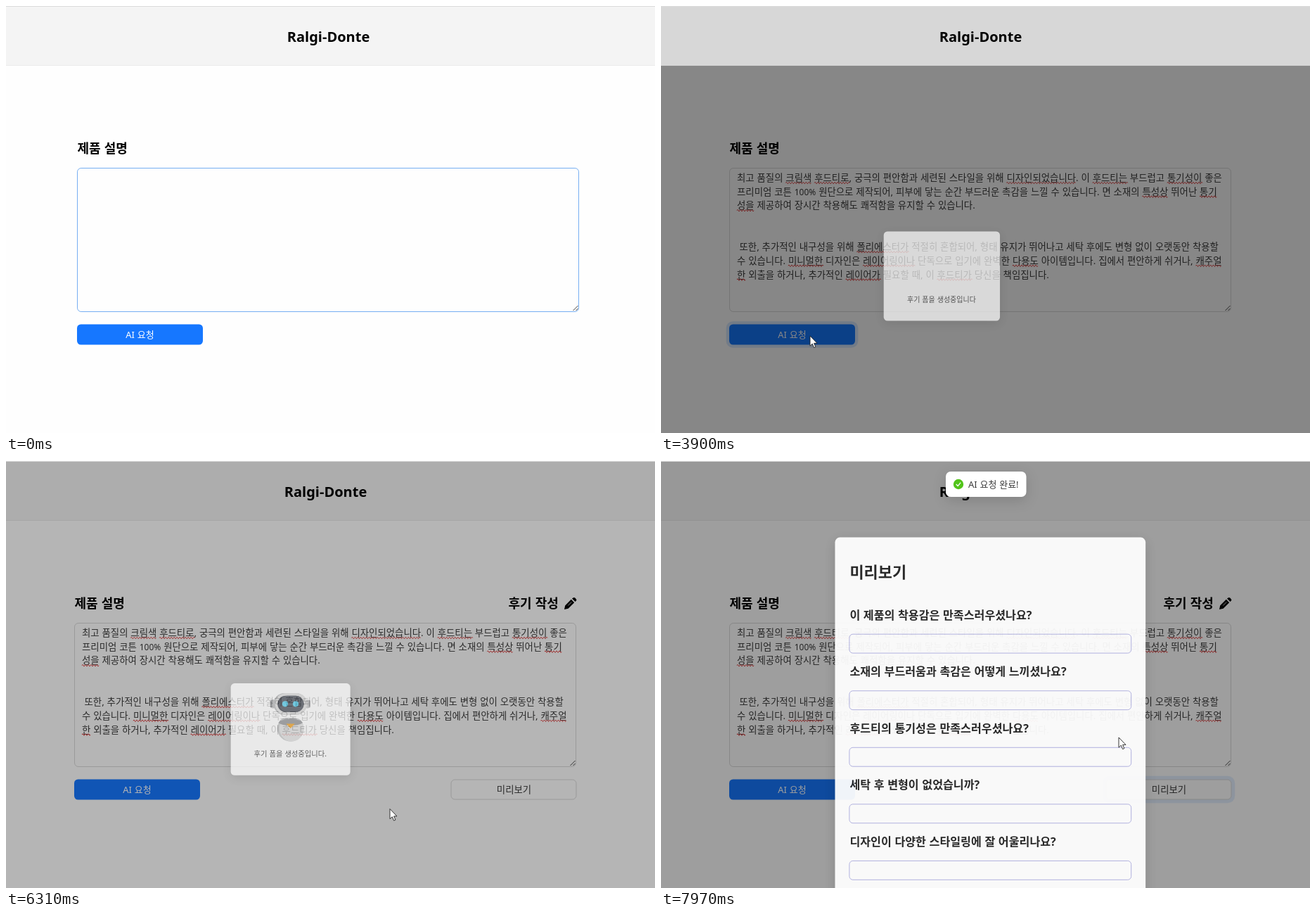
Recreate the animation shown at these times as an HTML page. Size 923 px wide and 607 px high, loop 8000 ms.

```html
<!DOCTYPE html>
<html lang="ko">
<head>
<meta charset="utf-8">
<style>
html, body { margin: 0; width: 100%; height: 100%; overflow: hidden; background: #fefefe; }
svg { display: block; width: 100%; height: 100%; }
text { font-family: "Noto Sans", "Noto Sans CJK KR", sans-serif; word-spacing: .4px; white-space: pre; }
.card { filter: drop-shadow(0 5px 9px rgba(0, 0, 0, .14)); }
</style>
</head>
<body>
<svg id="stage" viewBox="0 0 923 607"></svg>
<script>
const LOOP = 8000, BLUE = [22, 119, 255], LIGHT = [64, 150, 255], GRAY = [217, 217, 217], INK = [60, 60, 60];
const OPEN1 = 3860, CLOSE1 = 6240, OPEN2 = 7840, PASTE = 2060;

// Brackets mark words flagged by the spell checker.
const lines = [
  [112, 249, '최고 품질의 [크림색] [후드티로], 궁극의 편안함과 세련된 스타일을 위해 [디자인되었습니다]. 이 [후드티는] 부드럽고 [통기성이] 좋은'],
  [112, 268.6, '프리미엄 코튼 100% 원단으로 제작되어, 피부에 닿는 순간 부드러운 촉감을 느낄 수 있습니다. 면 소재의 [특성상] 뛰어난 [통기]'],
  [112, 288.2, '[성을] 제공하여 장시간 착용해도 쾌적함을 유지할 수 있습니다.'],
  [115.5, 347.2, '또한, 추가적인 내구성을 위해 [폴리에스터가] 적절히 혼합되어, 형태 유지가 뛰어나고 세탁 후에도 변형 없이 오랫동안 착용할'],
  [112, 366.8, '수 있습니다. [미니멀한] 디자인은 [레이어링이나] 단독으로 입기에 완벽한 [다용도] 아이템입니다. 집에서 편안하게 쉬거나, [캐주얼]'],
  [112, 386.5, '[한] 외출을 하거나, 추가적인 [레이어가] 필요할 때, 이 [후드티가] 당신을 책임집니다.']
];
const questions = [
  '이 제품의 착용감은 만족스러우셨나요?', '소재의 부드러움과 촉감은 어떻게 느끼셨나요?',
  '후드티의 통기성은 만족스러우셨나요?', '세탁 후 변형이 없었습니까?', '디자인이 다양한 스타일링에 잘 어울리나요?'
];
const pointers = {
  arrow: 'M0 0V14.2L3.3 11.2 5.6 16.6 7.9 15.6 5.6 10.4H10z',
  hand: 'M-1.5 12V.8q0-1.6 1.4-1.6T1.3 .8V7q1-.9 2.4 .2 1.2-.7 2.3 .5 2.3-.2 2.3 1.6V13q0 3-2 6H-1.5q-1.5-3.5-4.5-6.5-.8-2.4 1.2-2 1.8 .7 3.3 2.5z',
  beam: 'M-2.5-8H-1L0-7 1-8H2.5M0-7V7M-2.5 8H-1L0 7 1 8H2.5'
};
const track = [
  [580, 430, 607], [1000, 400, 430], [1340, 352, 270], [1390, 352, 270], [1710, 472, 458],
  [2210, 472, 458], [2480, 390, 481], [2730, 222, 470], [2930, 222, 470], [3100, 212, 469],
  [4000, 212, 469], [4300, 512, 508], [5040, 512, 508], [5390, 528, 515], [5750, 528, 515],
  [5950, 524, 512], [6220, 524, 512], [6700, 640, 420], [7000, 690, 400], [7320, 737, 464],
  [7800, 737, 464], [7970, 651, 393]
];

const text = (x, y, size, str, more = '') => `<text x="${x}" y="${y}" font-size="${size}" ${more}>${str}</text>`;
const rect = (x, y, w, h, r, more = '') => `<rect x="${x}" y="${y}" width="${w}" height="${h}" rx="${r}" ${more}/>`;
const bold = 'font-weight="700"', mid = 'text-anchor="middle"';

const robot = `<g id="robot">
  ${rect(425, 300, 9, 14, 1.5, 'fill="#8f9093"')}${rect(490, 300, 9, 14, 1.5, 'fill="#aaabad"')}
  ${rect(428, 299, 5, 16, 1, 'fill="#b8b9ba"')}${rect(492, 299, 4, 16, 1, 'fill="#c4c5c6"')}
  ${rect(431, 287, 62, 40, 20, 'fill="#b9babb"')}${rect(434, 287, 59, 40, 20, 'fill="#dfdfdf"')}
  ${rect(438.5, 292, 48.5, 30, 15, 'fill="#40444d"')}${rect(442, 292, 45, 30, 15, 'fill="#51555e"')}
  <g fill="#59d0ef"><circle cx="452.5" cy="307" r="5.3"/><circle cx="472" cy="307" r="5.3"/></g>
  <path d="M441 341q-3 6-3 11a24.500 24.500 0 0 0 49 0q0-5-3-11z" fill="#c5c6c7"/>
  <path d="M445 341q-3 6-3 11a22.500 24.500 0 0 0 45 0q0-5-3-11z" fill="#dedede"/>
  <path d="M440 342q4-9.500 22.500-9.500T485 342q-8 5-22.500 5T440 342z" fill="#929497"/>
  <path d="M443 338q6-5.500 19.500-5.500T482 338q-9-3-19.500-3T443 338z" fill="#d0d1d2"/>
  <path d="M454.500 343.500h16l-8 8.500z" fill="#efa124"/></g>`;

stage.innerHTML = `
  <rect width="923" height="607" fill="#fefefe"/>
  <g id="page">
    ${text(101.5, 209, 18, '제품 설명', bold)}
    ${rect(101.5, 230.5, 713, 204, 5.4, 'id="area" fill="#fefefe"')}
    <path d="M806.500 433l7-7M810.500 433l3-3" stroke="#444" fill="none"/>
    <g id="copy" fill="#3c3c3c"></g>
    <g fill="none" stroke="#e23b3b"><path id="early"/><path id="late"/></g>
    <rect id="caret" width="1" height="17"/>
    <rect id="wave1" fill="#1677ff"/>
    ${rect(101, 452.5, 179, 29, 5.4, 'id="ask"')}
    ${text(190.5, 472, 13, 'AI 요청', mid + ' fill="#fff"')}
    <g id="extra">
      ${text(718.5, 209, 18, '후기 작성', bold)}
      <path d="M798 211l1.200-5.600 8.600-8.600 4.400 4.400-8.600 8.600zM809 195.600l1.600-1.200q1.400-.9 2.600.2l1.600 1.600q1.200 1.200 .1 2.500l-1.400 1.400z"/>
      <path d="M803.300 205.500l5-5" stroke="#fff" stroke-width=".8"/>
      <rect id="wave2" fill="#4096ff"/>
      ${rect(637, 453, 178, 28, 5.4, 'id="preview" fill="#fefefe"')}
      ${text(726.5, 472, 13.4, '미리보기', mid + ' id="previewText"')}
    </g>
  </g>
  <rect id="dim" y="84" width="923" height="523" opacity=".4"/>
  <rect width="923" height="85" fill="#f4f4f4"/><rect y="84" width="923" height="1" fill="#ebebeb"/>
  ${text(458.5, 51, 20, 'Ralgi-Donte', `${mid} ${bold} id="brand"`)}
  <rect id="mask" width="923" height="607"/>
  <rect width="923" height="1" fill="#dcdcdc"/>
  <g id="waiting"><g class="card">${rect(352, 269, 221, 170, 7, 'fill="#fff"')}</g>
    ${robot}${text(462, 404, 13.4, '', mid + ' id="status" fill="#3c3c3c"')}</g>
  <g id="form"><g class="card">${rect(246, 107.5, 443, 560, 7, 'fill="#fff"')}</g>
    ${text(267, 165, 22, '미리보기', bold + ' fill="#222"')}
    ${questions.map((q, i) => text(267, 224 + i * 80.8, 16.2, q, bold + ' fill="#222"') +
      rect(266.5, 245.5 + i * 80.8, 402, 27, 5, 'fill="none" stroke="#b3b3e3"')).join('')}</g>
  <g id="toast"><g class="card">${rect(401, 15, 114.5, 36, 7, 'fill="#fff"')}</g>
    <circle cx="419" cy="33" r="7.200" fill="#52c41a"/>
    <path d="M415.800 33l2.400 2.500 4-4.800" fill="none" stroke="#fff" stroke-width="1.300"/>
    ${text(433, 38.2, 13, 'AI 요청 완료!', 'fill="#3c3c3c"')}</g>
  <path id="pointer" stroke="#222" stroke-width=".9" stroke-linejoin="round"/>`;

const $ = id => document.getElementById(id);
const set = (id, props) => { for (const k in props) $(id).setAttribute(k, props[k]); };
const show = (id, on) => set(id, { visibility: on ? 'visible' : 'hidden' });
const clamp = v => Math.max(0, Math.min(1, v));
const mix = (a, b, k) => `rgb(${a.map((v, i) => Math.round(v + (b[i] - v) * k))})`;

// Text lines and the squiggles below flagged words.
const squiggles = ['', ''];
lines.forEach(([x, y, str], row) => {
  const parts = str.split(/[\[\]]/);
  copy.insertAdjacentHTML('beforeend', text(x, y, 13.4, parts.join('').replace('100%', '<tspan font-size="12">100%</tspan>')));
  const node = copy.lastChild;
  let at = 0;
  parts.forEach((part, i) => {
    if (i % 2) {
      const from = node.getStartPositionOfChar(at).x;
      const to = node.getEndPositionOfChar(at + part.length - 1).x;
      squiggles[row < 3 ? 1 : 0] += `M${from} ${y + 2.5}q1-2.600 2 0` + 't2 0'.repeat(Math.round((to - from) / 2) - 1);
    }
    at += part.length;
  });
});
set('early', { d: squiggles[0] });
set('late', { d: squiggles[1] });

// Piecewise linear value; keys are [time, ...values].
function at(t, keys) {
  const i = keys.findIndex(k => k[0] > t);
  if (i < 0) return keys[keys.length - 1].slice(1);
  if (!i) return keys[0].slice(1);
  const a = keys[i - 1], b = keys[i], k = (t - a[0]) / (b[0] - a[0]);
  return a.slice(1).map((v, j) => v + (b[j + 1] - v) * k);
}
const ramp = (t, ...keys) => at(t, keys)[0];

// cubic-bezier(.08, .82, .17, 1)
function easeOut(x) {
  x = clamp(x);
  let lo = 0, hi = 1, u;
  for (let i = 0; i < 20; i++) {
    u = (lo + hi) / 2;
    const v = 1 - u;
    if (3 * v * v * u * .08 + 3 * v * u * u * .17 + u ** 3 < x) lo = u; else hi = u;
  }
  return 3 * (1 - u) ** 2 * u * .82 + 3 * (1 - u) * u * u + u ** 3;
}

function zoom(id, p, x, y, full = 1) {
  show(id, p > .001);
  const s = (.2 + .8 * p) * full;
  set(id, { opacity: p, transform: `translate(${x} ${y}) scale(${s}) translate(${-x} ${-y})` });
}

function ripple(id, x, age) {
  const grow = 5 * easeOut(age / 400);
  set(id, {
    x: x - grow, y: 452.5 - grow, width: 179 + 2 * grow, height: 29 + 2 * grow, rx: 5.4 + grow,
    opacity: age < 0 ? 0 : .22 * clamp(1 - age / 500)
  });
}

function drawPointer(t, modal) {
  const [x, y] = at(t, track);
  const over = (l, r, top, bottom) => !modal && x > l && x < r && y > top && y < bottom;
  const kind = over(101, 280, 453, 482) || (t > CLOSE1 && over(637, 815, 453, 482)) ? 'hand'
    : over(101, 815, 230, 435) ? 'beam' : 'arrow';
  show('pointer', t >= 580);
  set('pointer', { d: pointers[kind], fill: kind == 'beam' ? 'none' : '#fff', transform: `translate(${x} ${y})` });
}

function draw(t) {
  const shifted = (t >= 3840 && t < 6440) || t >= OPEN2;
  const shift = shifted ? 'translate(-4 0)' : '';
  set('page', { transform: shift });
  set('brand', { transform: shift });

  const pasted = t >= PASTE;
  show('copy', pasted);
  show('early', pasted);
  show('late', t >= 2930);
  show('caret', (t >= 1330 && t < 1860) || (pasted && t < 2590) || (t >= 3100 && t < 3640));
  set('caret', pasted ? { x: 553, y: 373 } : { x: 112, y: 235 });

  const glow = ramp(t, [0, .65], [160, 0], [980, 0], [1180, 1], [3700, 1], [3900, 0], [6560, 0], [6700, 1], [7050, 1], [7250, 0]);
  set('area', { stroke: mix(GRAY, LIGHT, glow) });
  set('ask', { fill: mix(BLUE, LIGHT, ramp(t, [2600, 0], [2730, 1], [3700, 1], [3860, 0])) });
  const hover = ramp(t, [7180, 0], [7380, 1], [7780, 1], [7930, 0]);
  set('preview', { stroke: mix(GRAY, LIGHT, hover) });
  set('previewText', { fill: mix(INK, LIGHT, hover) });
  show('extra', t >= CLOSE1);
  ripple('wave1', 101, t - 3785);
  ripple('wave2', 636.5, t - 7790);

  show('dim', t >= 3840 && t < CLOSE1);
  set('mask', { opacity: ramp(t, [OPEN1, 0], [4015, .45], [CLOSE1, .45], [6440, 0], [OPEN2, 0], [7995, .45]) });

  const leave = clamp((t - CLOSE1) / 200);
  zoom('waiting', easeOut((t - OPEN1) / 300) * (1 - leave * leave * (3 - 2 * leave)), 212, 473);
  show('robot', t >= 4150 && t < 6440);
  const dots = t < 3840 ? 0 : Math.floor((t - 3840) / 478) % 4;
  $('status').textContent = '후기 폼을 생성중입니다' + '.'.repeat(dots);
  zoom('form', easeOut((t - OPEN2) / 300), 738, 470, 1 / .955);

  const drop = easeOut((t - 6320) / 300);
  show('toast', t > 6320);
  set('toast', { opacity: drop, transform: `translate(${shifted ? 4 : 0} ${-40 * (1 - drop)})` });

  drawPointer(t, (t >= 3740 && t < 6440) || t >= OPEN2);
}

const start = performance.now();
function tick() {
  draw((performance.now() - start) % LOOP);
  requestAnimationFrame(tick);
}
draw(0);
requestAnimationFrame(tick);
</script>
</body>
</html>
```
